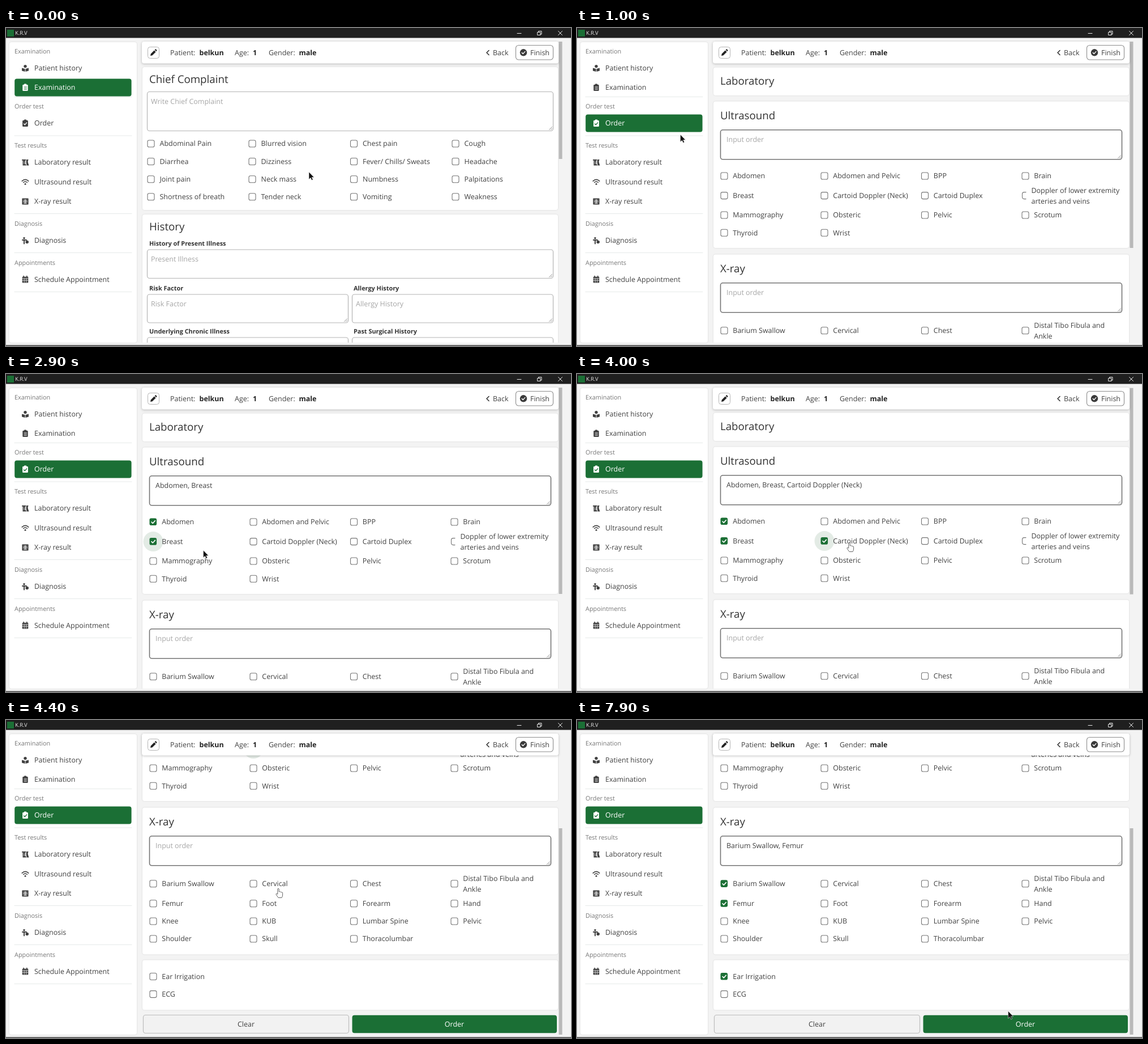
Recreate the animation shown at these times as an HTML page. Size 998 px wide and 561 px high, loop 8000 ms.

```html
<!DOCTYPE html>
<html lang="en">
<head>
<meta charset="utf-8">
<title>Patient order form</title>
<style>
  html, body { margin: 0; width: 100%; height: 100%; overflow: hidden; background: #f3f3f3; }
  svg { display: block; width: 100%; height: 100%; font-family: "Open Sans", "Noto Sans", sans-serif; }
  #screen { filter: blur(.35px); }
  text { white-space: pre; text-rendering: geometricPrecision; }
  .card { fill: #fff; filter: drop-shadow(0 0.5px 1px rgba(0, 0, 0, .13)); }
  .bar { fill: #fff; filter: drop-shadow(0 1.5px 2px rgba(0, 0, 0, .24)); }
</style>
</head>
<body>
<svg id="stage" viewBox="0 0 998 561"></svg>
<script>
const LOOP = 8000, STEP = 100;
const GREEN = '#1b6f35', INK = '#414141', MUTED = '#777', HINT = '#a6a6a6';
const BODY = 12.47, SMALL = 10.9, TITLE = 18.7;
const ORDER_OPENS = 900;

// y is the middle of the capitals
const text = (x, y, s, { size = BODY, fill = INK, weight = 400, anchor = 'start' } = {}) =>
  `<text x="${x}" y="${y + size * .36}" font-size="${size}" font-weight="${weight}" fill="${fill}" text-anchor="${anchor}">${s}</text>`;
const rect = (x, y, w, h, fill, r = 0, more = '') =>
  `<rect x="${x}" y="${y}" width="${w}" height="${h}" rx="${r}" fill="${fill}" ${more}/>`;
const line = (d, stroke, width = 1) =>
  `<path d="${d}" fill="none" stroke="${stroke}" stroke-width="${width}" stroke-linecap="round" stroke-linejoin="round"/>`;
const card = (y, h) => `<rect class="card" x="241" y="${y}" width="734" height="${h}" rx="4"/>`;
const title = (y, s) => text(253, y, s, { size: TITLE, fill: '#333' });
const during = (on, off, body) => `<g data-on="${on}" data-off="${off}">${body}</g>`;

function area(x, y, w, h, hint, hintX, strong, entries = []) {
  const right = x + w, bottom = y + h;
  const typed = [[0, hint], ...entries].map(([at, s], i, all) =>
    during(at, all[i + 1]?.[0] ?? LOOP, text(hintX, y + 17, s, { fill: i ? INK : HINT })));
  return rect(x, y, w, h, '#fff', 4, `stroke="${strong ? '#747474' : '#b4b4b4'}" stroke-width="${strong ? 1.6 : 1.2}"`) +
    line(`M${right - 7} ${bottom - 2}l5 -5M${right - 4} ${bottom - 2}l2 -2`, '#777', .8) + typed.join('');
}

function check(x, y, label, labelX, { at, hover } = {}) {
  const box = rect(x - 6, y - 6, 12, 12, '#fff', 2.8, 'stroke="#767676" stroke-width="1.1"');
  const full = rect(x - 6.5, y - 6.5, 12.6, 12.6, GREEN, 2.8) + line(`M${x - 3} ${y}l2.2 2.4 4.2 -4.6`, '#fff', 1.6);
  const halo = hover ? during(...hover, `<circle cx="${x}" cy="${y}" r="17.5" fill="#e3ebe5"/>`) : '';
  const face = at ? during(0, at, box) + during(at, LOOP, full) : box;
  return halo + face + text(labelX, y, label);
}

// Two-line labels squeeze or shift their box
const wrapped = (y, x, first, second, squeezed) =>
  (squeezed
    ? line(`M793 ${y - 6}h-3q-3.5 0 -3.5 3.5v5q0 3.5 3.5 3.5h3`, '#767676', 1.1)
    : check(792, y, '', x)) +
  text(x, y - 9, first) + text(x, y + 9.5, second);

function grid(labels, rows, boxes, gap, picks = {}) {
  return labels.map((s, i) => {
    const x = boxes[i % 4];
    return s ? check(x, rows[i >> 2], s, x + gap, picks[s]) : '';
  }).join('');
}

const ICONS = {
  reader: c => `<circle cx="0" cy="-3.4" r="2.7" fill="${c}"/><path d="M-6 -.5L-.5 1V6L-6 4.6ZM6 -.5L.5 1V6L6 4.6Z" fill="${c}"/>`,
  board: (c, b) => rect(-4.7, -5, 9.4, 11, c, 1.3) + rect(-2.2, -6.5, 4.4, 3, c, 1) +
    line('M-1.8 -1.2H2.4M-1.8 1.1H2.4M-1.8 3.4H2.4', b, .8),
  tick: (c, b) => rect(-4.9, -5, 9.8, 11, c, 1.3) + rect(-2.2, -6.5, 4.4, 3, c, 1) + line('M-2.4 1l1.7 1.8 3.2 -3.8', b, 1.3),
  lab: (c, b) => rect(-5.8, -5.2, 7, 2, c) + `<path d="M-4.5 -3H0V2L2 5.5H-4.5ZM2 -5H5.5V-3.8L4.7 -3.5V0L6.5 5.5H2.5L1.5 0Z" fill="${c}"/>` +
    line('M-3 -.5H-1M-3 2H-.5', b, .8),
  waves: c => line('M-5.8 -1.4Q0 -6.8 5.8 -1.4M-3.4 1Q0 -2 3.4 1', c, 1.5) + `<circle cx="0" cy="3.8" r="1.5" fill="${c}"/>`,
  xray: (c, b) => rect(-5.6, -5.5, 11.2, 11, c, .8) + line('M0 -3.7V3.5M-3 -2H3M-3.5 .4H3.5M-2.5 3H2.5', b, 1),
  person: c => `<circle cx="-2" cy="-4.2" r="1.8" fill="${c}"/>` + line('M-5 -1H2M-2 -1V5.5', c, 2) +
    `<circle cx="3.2" cy="2.5" r="2.8" fill="${c}"/>`,
  calendar: (c, b) => rect(-5.3, -4.7, 10.6, 10.7, c, 1.2) + line('M-2.8 -6V-4M2.8 -6V-4', c, 1.6) +
    line('M-5 -1.6H5M-5 1.8H5M-1.8 -1.6V5.4M1.8 -1.6V5.4', b, .7)
};

function menuItem(y, name, label, [on, off] = [0, 0]) {
  const face = (ink, back) => `<g transform="translate(34 ${y})">${ICONS[name](ink, back)}</g>` + text(50, y, label, { fill: ink });
  return face(INK, '#fff') + (off ? during(on, off, rect(15.2, y - 15.4, 206.4, 31, GREEN, 4) + face('#fff', GREEN)) : '');
}

const sidebar = () => {
  const heads = { 41: 'Examination', 138: 'Order test', 207: 'Test results', 345: 'Diagnosis', 414: 'Appointments' };
  return '<rect class="card" x="6" y="25" width="225" height="530" rx="4"/>' +
    Object.entries(heads).map(([y, s]) => text(15, +y, s, { size: SMALL, fill: MUTED })).join('') +
    [121.5, 190, 327.5, 396.5, 465.5].map(y => line(`M15 ${y}H222`, '#e6eae9')).join('') +
    during(500, ORDER_OPENS, rect(15, 152.5, 207, 31, '#f2f2f2', 4)) +
    menuItem(71, 'reader', 'Patient history') +
    menuItem(105, 'board', 'Examination', [0, ORDER_OPENS]) +
    menuItem(168, 'tick', 'Order', [ORDER_OPENS, LOOP]) +
    menuItem(237, 'lab', 'Laboratory result') +
    menuItem(271.5, 'waves', 'Ultrasound result') +
    menuItem(306, 'xray', 'X-ray result') +
    menuItem(375, 'person', 'Diagnosis') +
    menuItem(443.5, 'calendar', 'Schedule Appointment');
};

const header = () => {
  const bold = { weight: 700, fill: '#222' };
  return '<rect class="bar" x="240" y="24" width="736" height="38.5" rx="4"/>' +
    rect(250.5, 33.5, 20, 20, '#fff', 4, 'stroke="#b5b5b5"') +
    '<path d="M255 49l.8 -3.6 6 -6 2.8 2.8 -6 6ZM262.6 38.6l1 -1q.8 -.6 1.6 .2l1 1q.7 .8 0 1.5l-1 1Z" fill="#222"/>' +
    text(290, 43.5, 'Patient:') + text(341.5, 43.5, 'belkun', bold) +
    text(404, 43.5, 'Age:') + text(436, 43.5, '1', bold) +
    text(464, 43.5, 'Gender:') + text(517.5, 43.5, 'male', bold) +
    line('M853 39.5l-4 4 4 4', '#333', 1.6) + text(860, 43.5, 'Back') +
    rect(900.5, 30.5, 66, 25.5, '#fff', 5, 'stroke="#8c8c8c" stroke-width="1.1"') +
    '<circle cx="914" cy="43.3" r="6.2" fill="#3a3a3a"/>' + line('M911.2 43.5l2 2.1 3.6 -4', '#fff', 1.4) +
    text(926, 43.5, 'Finish');
};

const titleBar = () => rect(0, 0, 998, 17.5, '#1f1f1f') + rect(2, 3, 12, 12, GREEN) +
  text(16, 9, 'K.R.V', { size: 9.4, fill: '#eee' }) +
  line('M903 9.5H910M939 7.5h5v5h-5ZM940.5 7.5v-2h5.5v5.5h-2M975.5 5.5l7 7M982.5 5.5l-7 7', '#e8e8e8', 1);

const examPage = () => {
  const label = (x, y, s) => text(x, y, s, { size: SMALL, weight: 700, fill: '#333' });
  return card(69, 252) + title(90, 'Chief Complaint') +
    area(249.5, 112.5, 717, 69, 'Write Chief Complaint', 256) +
    grid(['Abdominal Pain', 'Blurred vision', 'Chest pain', 'Cough', 'Diarrhea', 'Dizziness', 'Fever/ Chills/ Sweats', 'Headache',
      'Joint pain', 'Neck mass', 'Numbness', 'Palpitations', 'Shortness of breath', 'Tender neck', 'Vomiting', 'Weakness'],
      [204, 235.5, 266.7, 297.8], [256, 435, 614.5, 794], 15.5) +
    card(329, 300) + title(350, 'History') +
    label(253, 380, 'History of Present Illness') + area(249.5, 391, 717, 50.5, 'Present Illness', 256) +
    label(253, 459, 'Risk Factor') + area(249.5, 470, 355, 50, 'Risk Factor', 256) +
    label(614, 459, 'Allergy History') + area(611.5, 470, 355, 50, 'Allergy History', 618) +
    label(253, 535, 'Underlying Chronic Illness') + area(249.5, 546, 355, 50, '', 256) +
    label(614, 535, 'Past Surgical History') + area(611.5, 546, 355, 50, '', 618);
};

const orderPage = () => {
  const boxes = [260, 437, 614.5, 792], gap = 15.3;
  return card(69.5, 49.5) + title(93.5, 'Laboratory') +
    card(129.5, 258.5) + title(154, 'Ultrasound') +
    area(253.5, 179.8, 709, 52, 'Input order', 264, true,
      [[2100, 'Abdomen'], [2500, 'Abdomen, Breast'], [3500, 'Abdomen, Breast, Cartoid Doppler (Neck)']]) +
    grid(['Abdomen', 'Abdomen and Pelvic', 'BPP', 'Brain', 'Breast', 'Cartoid Doppler (Neck)', 'Cartoid Duplex', '',
      'Mammography', 'Obsteric', 'Pelvic', 'Scrotum', 'Thyroid', 'Wrist'], [261, 295.6, 330, 361.2], boxes, gap, {
      'Abdomen': { at: 2100, hover: [1700, 2400] },
      'Breast': { at: 2500, hover: [2400, 3000] },
      'Cartoid Doppler (Neck)': { at: 3500, hover: [3400, 4500] }
    }) + wrapped(295.6, 802.5, 'Doppler of lower extremity', 'arteries and veins', true) +
    card(399.5, 259) + title(424, 'X-ray') +
    area(253.5, 449.8, 709, 52, 'Input order', 264, true, [[5000, 'Barium Swallow'], [5400, 'Barium Swallow, Femur']]) +
    grid(['Barium Swallow', 'Cervical', 'Chest', '', 'Femur', 'Foot', 'Forearm', 'Hand', 'Knee', 'KUB', 'Lumbar Spine', 'Pelvic',
      'Shoulder', 'Skull', 'Thoracolumbar'], [533.8, 568.7, 600, 631], boxes, gap, {
      'Barium Swallow': { at: 5000, hover: [4800, 5300] },
      'Femur': { at: 5400, hover: [5300, 5700] }
    }) + wrapped(533.8, 807.3, 'Distal Tibo Fibula and', 'Ankle') +
    card(668.5, 88) + check(260, 697.5, 'Ear Irrigation', 275.3, { at: 7300, hover: [7200, 7600] }) +
    check(260, 728.6, 'ECG', 275.3) +
    rect(242.5, 765.5, 363, 32, '#f2f2f2', 4, 'stroke="#bcbcbc" stroke-width="1.2"') +
    text(424, 782, 'Clear', { anchor: 'middle' }) +
    rect(611.5, 765.8, 361.5, 31.5, GREEN, 4) + text(792, 782, 'Order', { anchor: 'middle', fill: '#fff' });
};

const stage = document.getElementById('stage');
stage.innerHTML = '<clipPath id="view"><rect x="236" y="24" width="750" height="531"/></clipPath>' +
  rect(0, 0, 998, 561, '#f3f3f3') + '<g id="screen">' + sidebar() +
  '<g clip-path="url(#view)">' + during(0, ORDER_OPENS, examPage()) +
  during(ORDER_OPENS, LOOP, `<g id="scroller">${orderPage()}</g>`) + '</g>' +
  rect(976.5, 24, 6, 207, '#b9b9b9', 0, 'id="thumb"') + header() + titleBar() + rect(0, 559.3, 998, 1.7, '#555') +
  `<g id="pointer">
    <path id="arrow" d="M0 0V13L3 10.3 5 14.6 7.2 13.6 5.2 9.5H9.2Z" fill="#111" stroke="#fff" stroke-width=".5"/>
    <path id="hand" d="M-1.2 1Q0 -.8 1.2 1V6Q2.4 5 3.5 6.4 4.8 5.6 5.6 7 7.5 6.3 7.6 8.4V12Q7.4 14.5 6 16.5H0L-4 10.8Q-4.2 9 -2.6 9.2L-1.2 10.4Z" fill="#fff" stroke="#555" stroke-width=".9" stroke-linejoin="round"/>
  </g></g>`;

// [time, x, y]
const PATH = [[0, 535, 254], [300, 400, 232], [500, 225, 186], [700, 180, 166], [800, 180, 166], [1000, 182.5, 188],
  [1300, 230, 228], [1700, 286, 256], [1900, 292, 258], [2100, 292, 258], [2400, 294, 291], [2600, 296, 293],
  [2900, 348.5, 311], [3300, 450, 302], [3700, 481, 297], [4400, 481, 297], [4800, 314, 285], [5000, 310, 286],
  [5300, 298, 320], [5400, 298, 320], [5700, 420, 375], [6100, 517.5, 406], [6200, 517.5, 406], [6500, 500, 384],
  [6800, 400, 430], [7100, 337, 455], [7300, 334, 453], [7600, 560, 488], [7900, 761.5, 513.5], [LOOP, 761.5, 513.5]];
const SCROLL = [[3900, 0], [4000, 1], [4100, 62], [4200, 165], [4300, 232], [4400, 245]];
const HAND = [[500, 1000], [1700, 2700], [3400, 5600], [7100, 7500]];

function track(points, t) {
  if (t <= points[0][0]) return points[0].slice(1);
  const i = points.findIndex(p => p[0] > t);
  if (i < 0) return points.at(-1).slice(1);
  const [a, b] = [points[i - 1], points[i]], k = (t - a[0]) / (b[0] - a[0]);
  return a.slice(1).map((v, j) => v + (b[j + 1] - v) * k);
}

const byId = id => document.getElementById(id);
const show = (el, on) => { el.style.display = on ? '' : 'none'; };
const timed = [...stage.querySelectorAll('[data-on]')];

function render(t) {
  for (const el of timed) show(el, t >= +el.dataset.on && t < +el.dataset.off);
  const [scroll] = track(SCROLL, t), [x, y] = track(PATH, t);
  byId('scroller').setAttribute('transform', `translate(0 ${-scroll})`);
  byId('thumb').setAttribute('y', 24 + scroll * 167 / 245);
  byId('thumb').setAttribute('height', t < ORDER_OPENS ? 207 : 364);
  byId('pointer').setAttribute('transform', `translate(${x} ${y})`);
  const pointing = HAND.some(([on, off]) => t >= on && t < off);
  show(byId('hand'), pointing);
  show(byId('arrow'), !pointing);
}

const start = performance.now();
let shown = -1;
function tick() {
  const t = Math.floor((performance.now() - start) % LOOP / STEP) * STEP;
  if (t !== shown) render(shown = t);
  requestAnimationFrame(tick);
}
tick();
</script>
</body>
</html>
```
